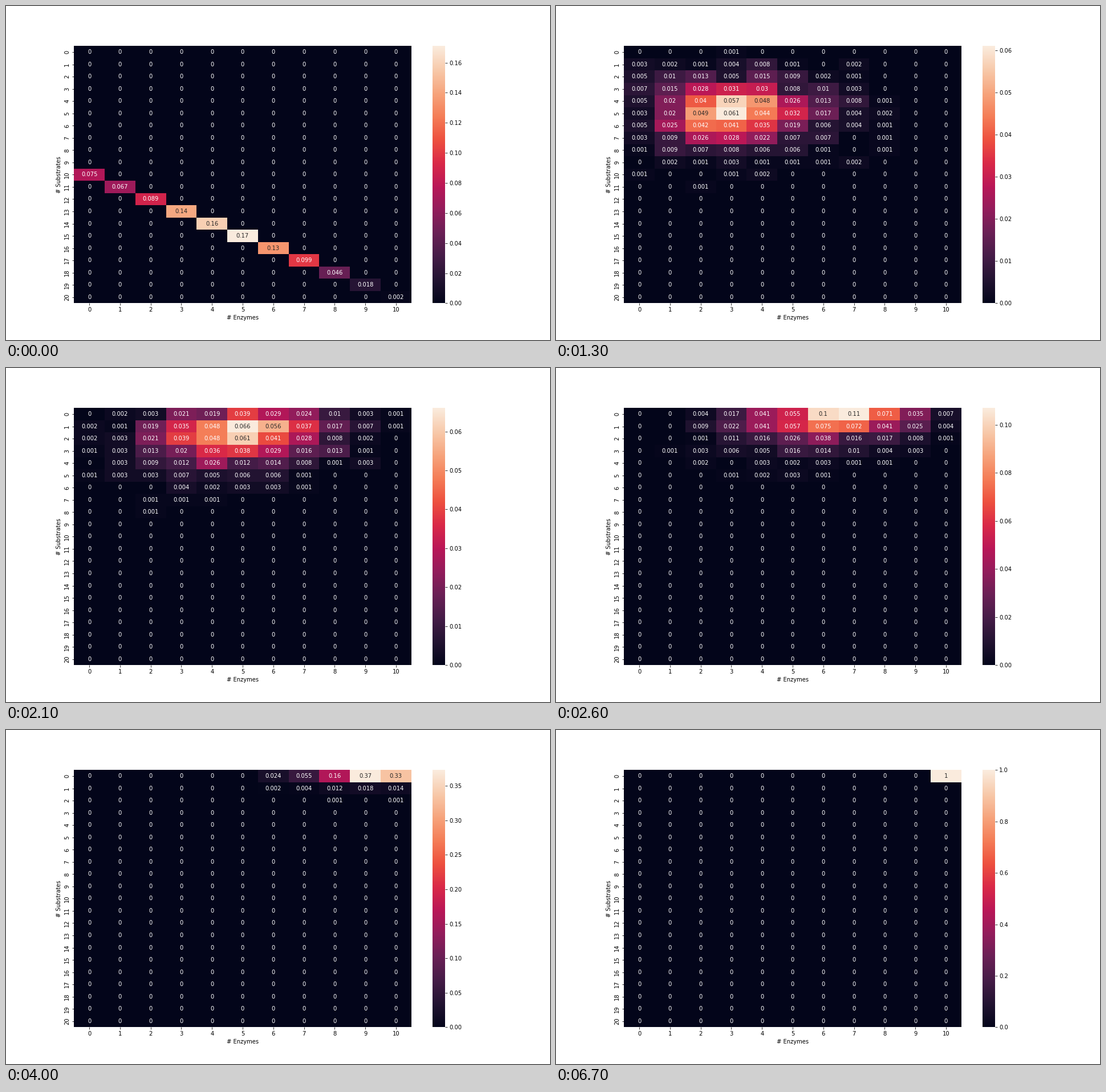
These frames come from a looping animation (954x587 px, 6.8 s). A matplotlib script:

```python
import numpy as np
import matplotlib.pyplot as plt
from matplotlib.animation import FuncAnimation
from matplotlib.colors import LinearSegmentedColormap

W, H, DPI = 954, 587, 72
FRAMES, INTERVAL = 68, 100
SUBSTRATES, ENZYMES, RUNS = 20, 10, 1000
ROWS, COLS = SUBSTRATES + 1, ENZYMES + 1
BIND = 0.0293    # binding propensity per substrate-enzyme pair
RELEASE = 0.086  # initial release propensity per complex

plt.rcParams.update({"font.family": "DejaVu Sans", "font.size": 10})

rocket = LinearSegmentedColormap.from_list("heat", [
    "#03051a", "#221331", "#451c47", "#691f55", "#921c5b", "#b91657",
    "#d92847", "#ed503e", "#f47d57", "#f6a47c", "#f7c9aa", "#faebdd"])


def leap(s, e, release, rng):
    """One tau-leap of S + E -> C -> P + E for every run."""
    c = ENZYMES - e
    bound = np.minimum(rng.poisson(BIND * s * e), np.minimum(s, e))
    freed = np.minimum(rng.poisson(release * c), c)
    return s - bound, e - bound + freed


def simulate(seed=4):
    """Share of runs in each (substrates, enzymes) state over time."""
    rng = np.random.default_rng(seed)
    grids = np.zeros((FRAMES, ROWS, COLS))
    s, e = np.full(RUNS, SUBSTRATES), np.full(RUNS, ENZYMES)
    for t, grid in enumerate(grids):
        # Release speeds up so that every run ends with all enzymes free.
        done = max(t - 1, 0) / (FRAMES - 1)
        s, e = leap(s, e, RELEASE / (1 - done ** 2), rng)
        np.add.at(grid, (s, e), 1 / RUNS)
    return grids.round(3)


def ink(rgba):
    """Dark text on light cells, white on the others."""
    rgb = rgba[..., :3]
    lin = np.where(rgb <= 0.03928, rgb / 12.92, ((rgb + 0.055) / 1.055) ** 2.4)
    light = lin @ [0.2126, 0.7152, 0.0722] > 0.408
    return np.where(light, "0.15", "w")


grids = simulate()

fig, ax = plt.subplots(figsize=(W / DPI, H / DPI), dpi=DPI, facecolor="white")
mesh = ax.pcolormesh(grids[0], cmap=rocket, vmin=0, vmax=grids[0].max())
ax.set(xlim=(0, COLS), ylim=(ROWS, 0),
       xlabel="# Enzymes", ylabel="# Substrates")
ax.set_xticks(np.arange(COLS) + 0.5, range(COLS))
ax.set_yticks(np.arange(ROWS) + 0.5, range(ROWS),
              rotation="vertical", va="center")
ax.spines[:].set_visible(False)
bar = fig.colorbar(mesh, ax=ax)
bar.outline.set_linewidth(0)

labels = [[ax.text(c + 0.5, r + 0.5, "", ha="center", va="center")
           for c in range(COLS)] for r in range(ROWS)]


def draw(t):
    grid = grids[t]
    mesh.set_array(grid)
    mesh.set_clim(0, grid.max())
    inks = ink(rocket(grid / grid.max()))
    for r, row in enumerate(labels):
        for c, label in enumerate(row):
            label.set_text(f"{grid[r, c]:.2g}")
            label.set_color(str(inks[r, c]))
    return [mesh]


anim = FuncAnimation(fig, draw, frames=FRAMES, interval=INTERVAL,
                     repeat=True, repeat_delay=0, blit=False)
plt.show()
```
